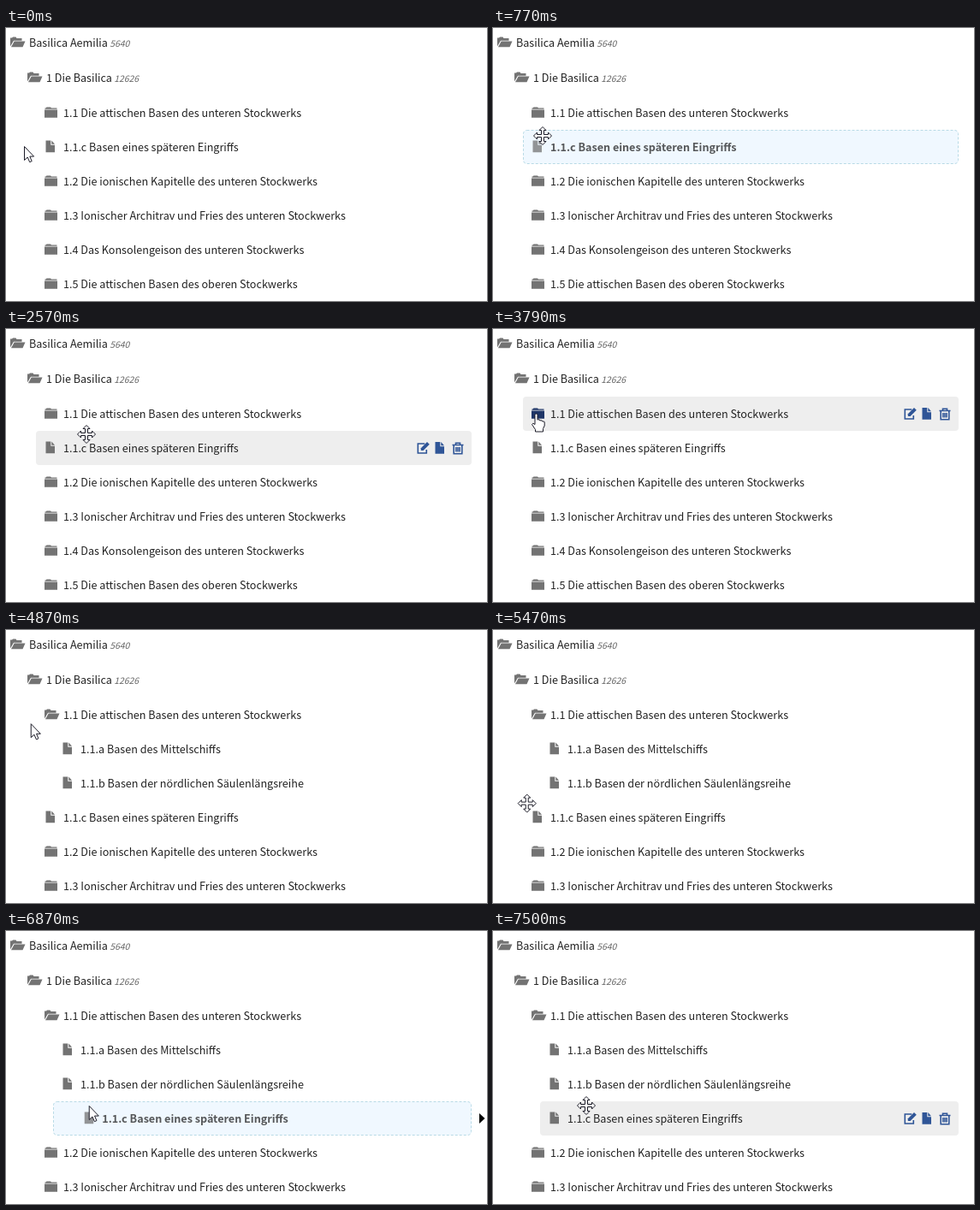
Recreate the animation shown at these times as an HTML page. Size 562 by 319 pixels, loop 8000 ms.

```html
<!DOCTYPE html>
<html lang="de">
<head>
<meta charset="utf-8">
<style>
html, body { margin: 0; width: 100%; height: 100%; overflow: hidden; background: #fff; }
svg { display: block; width: 562px; height: 319px; }
text { font: 12.6px "Noto Sans CJK SC", "Noto Sans CJK JP", "Noto Sans CJK", "Open Sans", sans-serif; fill: #222; }
.count { font-size: 10.4px; font-style: italic; fill: #666; }
.icon { fill: #737373; }
.icon.over { fill: #1f3667; }
.hover { fill: #eee; }
.slot { fill: #f0f8ff; stroke: #b8dae6; stroke-dasharray: 3 2; }
.held { opacity: .75; }
.held text { font-weight: 700; }
.action { fill: #2f5597; }
.line { fill: none; stroke: #2f5597; stroke-width: 1.6; }
.cursor { fill: #fff; stroke: #1c1c28; }
</style>
</head>
<body>
<svg id="stage" viewBox="0 0 562 319"></svg>
<script>
const LOOP = 8000, OPEN_AT = 4220, INDENT_AT = 6840;
const stage = document.getElementById('stage');

const icons = {
  closed: 'M.5-4.3V-5.4H1.5L2.5-6.5H7L8-5.4H14.5V-4.3ZM0-3.4H15V5.8H0Z',
  open: 'M0 4.5V-5.5H2L3-6.5H6.5L7.5-5H13.5V-2.3H4ZM4.7-1.4H17.5L14.5 5.3H1Z',
  file: 'M1.5-7.5H7.3V-2.3H12V6.2H1.5ZM8.3-7.5L12-3.3H8.3Z'
};

// One arrow arm, turned four times around the hotspot
let arm = [[-1.5, -1.5], [-1.5, -6.5], [-4, -6.5], [0, -10.5], [4, -6.5], [1.5, -6.5]];
let cross = [];
for (let i = 0; i < 4; i++) {
  cross.push(...arm);
  arm = arm.map(([x, y]) => [-y, x]);
}
const cursors = {
  arrow: 'M.5.5V16.5L4.2 13L6.7 18.7L9.2 17.6L6.8 12.1H11.6Z',
  hand: 'M-1.5 12V1.5a1.5 1.5 0 0 1 3 0V7q2.8-1 2.8 1q2.8-1 2.8 1q2.6-.5 2.6 1V14L8 17.5V21H-1V18.5L-5 12.5q1-2.5 3.5 0Z',
  move: 'M' + cross.join('L') + 'Z'
};

// Pointer strokes; bend is the sideways swing at the middle of the stroke
const home = { x: 21, y: 138 };
const strokes = [
  { from: 140, to: 570, x: 58, y: 126 },
  { from: 1460, to: 1670, x: 98, y: 126 },
  { from: 1800, to: 2310, x: 94, y: 123, bend: -20 },
  { from: 2930, to: 3250, x: 58, y: 112 },
  { from: 3450, to: 3790, x: 50.5, y: 99, bend: -6 },
  { from: 4720, to: 5500, x: 44, y: 203, bend: -37 },
  { from: 5640, to: 5700, x: 51, y: 203 },
  { from: 6330, to: 6930, x: 98, y: 204 },
  { from: 7050, to: 7170, x: 109, y: 204 }
];
const drags = [
  { from: 770, moves: 1460, to: 2540, x: 57.5 },
  { from: 6200, moves: 6330, to: 7470, x: 51.5 }
];

function pointerAt(t) {
  let { x, y } = home;
  for (const s of strokes) {
    const k = Math.min(1, Math.max(0, (t - s.from) / (s.to - s.from)));
    const ease = k * k * (3 - 2 * k);
    if (k) {
      x += (s.x - x) * ease + (s.bend || 0) * Math.sin(Math.PI * k);
      y += (s.y - y) * ease;
    }
  }
  return [x, y];
}

function rowsAt(t) {
  const open = t >= OPEN_AT;
  const chapter = label => [2, 'closed', label + ' Stockwerks'];
  const page = (level, label) => [level, 'file', label];
  return [
    [0, 'open', 'Basilica Aemilia', 5640],
    [1, 'open', '1 Die Basilica', 12626],
    [2, open ? 'open' : 'closed', '1.1 Die attischen Basen des unteren Stockwerks'],
    ...(open ? [
      page(3, '1.1.a Basen des Mittelschiffs'),
      page(3, '1.1.b Basen der nördlichen Säulenlängsreihe')
    ] : []),
    page(t >= INDENT_AT ? 3 : 2, '1.1.c Basen eines späteren Eingriffs'),
    chapter('1.2 Die ionischen Kapitelle des unteren'),
    chapter('1.3 Ionischer Architrav und Fries des unteren'),
    chapter('1.4 Das Konsolengeison des unteren'),
    chapter('1.5 Die attischen Basen des oberen')
  ].slice(0, 8);
}

const path = (cls, d, x = 0, y = 0) => `<path class="${cls}" d="${d}" transform="translate(${x} ${y})"/>`;
const box = (cls, x, y, w, h) => `<rect class="${cls}" x="${x}" y="${y}" width="${w}" height="${h}" rx="4"/>`;

function actions(y) {
  return path('line', 'M9-5H1V6H11V2', 480.3, y) +
    path('action', 'M4.5 3V.2L11.7-7L14.5-4.2L7.3 3Z', 480.3, y) +
    path('action', icons.file, 500, y + .5) +
    path('line', 'M1-4H14M5-4V-6.2H10V-4M2.7-4V6.3H12.3V-4M5.4-1.5V4M7.5-1.5V4M9.6-1.5V4', 520.5, y + .5);
}

function draw(t) {
  const [px, py] = pointerAt(t);
  const drag = drags.find(d => t >= d.from && t < d.to);
  const settling = drags.some(d => t >= d.to && t < d.to + 30);
  const overIcon = !drag && px >= 42 && px < 62 && py > 91 && py < 109;
  let out = '';

  rowsAt(t).forEach(([level, icon, label, count], i) => {
    const y = i < 2 ? 17 + 41 * i : 19 + 40 * i;
    const left = 20 * level - 5;
    const held = drag && label.startsWith('1.1.c');
    const hover = !drag && !settling && level > 1 && px > left + 7 && py >= y - 20 && py < y + 20;
    let x = 5 + 20 * level;
    if (held) {
      out += box('slot', left + .5, y - 19.5, 543 - left, 39);
      if (drag.from > OPEN_AT) out += path('', 'M0-6L6.5 0L0 6Z', 553, y);
      x = 45 + (t >= drag.moves ? Math.max(0, px - drag.x) : 0);
    }
    if (hover) out += box('hover', left, y - 20, 544 - left, 40) + actions(y);
    const lit = overIcon && hover ? ' over' : '';
    const tail = count ? `<tspan class="count" dx="2.3">${count}</tspan>` : '';
    out += `<g class="${held ? 'held' : ''}">` + path('icon' + lit, icons[icon], x, y) +
      `<text x="${x + 22}" y="${y + 5}">${label}${tail}</text></g>`;
  });

  const pulling = drag && t >= drag.moves;
  const kind = pulling || px < 35 ? 'arrow' : overIcon ? 'hand' : 'move';
  stage.innerHTML = out + path('cursor', cursors[kind], px, py);
}

function tick() {
  draw(performance.now() % LOOP);
  requestAnimationFrame(tick);
}
tick();
</script>
</body>
</html>
```
